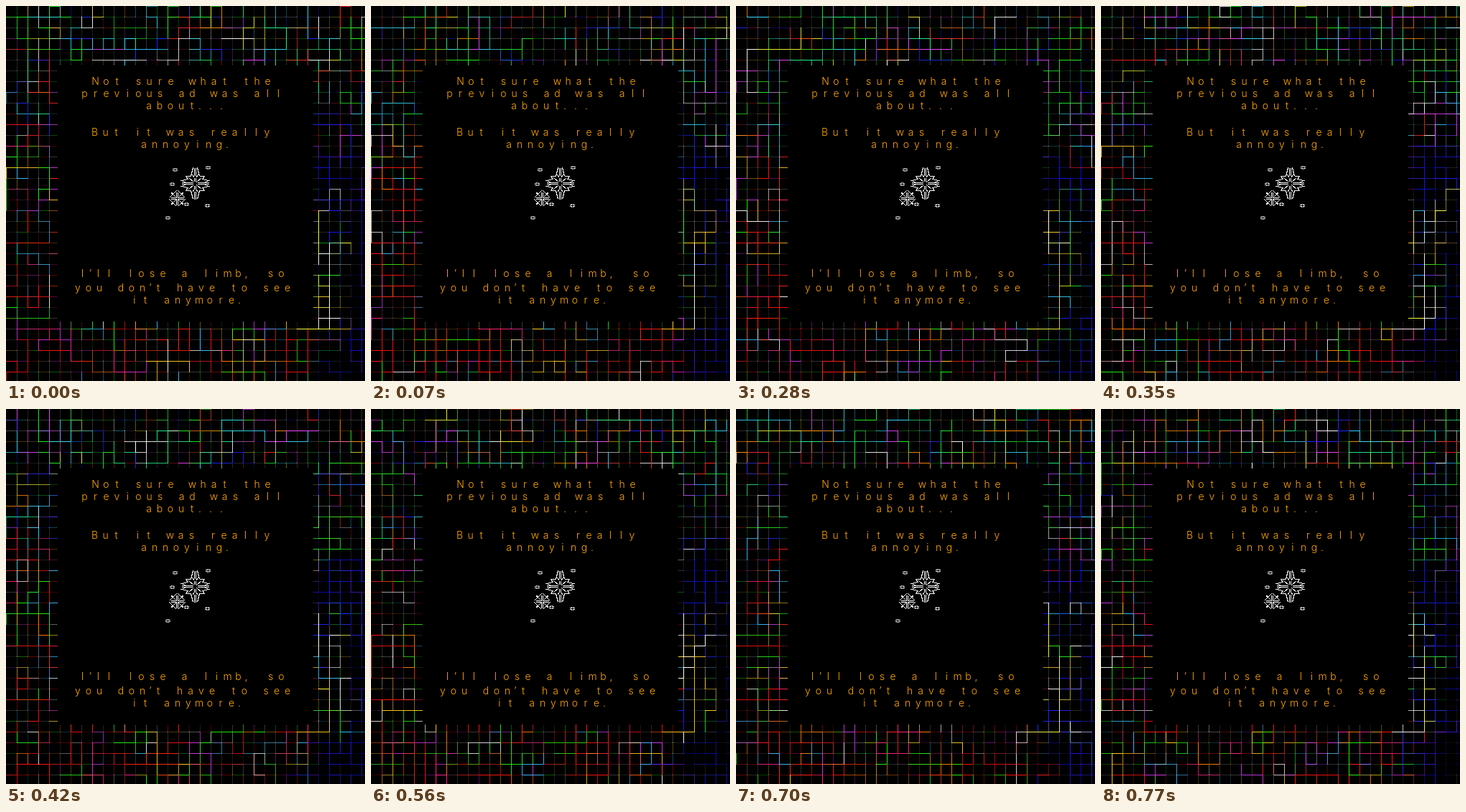
These frames come from a looping animation (500 by 523 pixels, 840 ms). An HTML page with a canvas:

```html
<!DOCTYPE html>
<html lang="en">
<head>
<meta charset="utf-8">
<title>Grid ad</title>
<style>
  html, body { margin: 0; width: 500px; height: 523px; overflow: hidden; background: #000; }
  canvas, svg { position: absolute; left: 0; top: 0; display: block; }
  text { font: 300 14px Inter, "DejaVu Sans", sans-serif; text-anchor: middle; fill: #ffa500; white-space: pre; }
  .star { fill: none; stroke: #fff; stroke-width: 1; shape-rendering: crispEdges; }
</style>
</head>
<body>
<canvas id="grid" width="500" height="523"></canvas>
<svg id="art" width="500" height="523" viewBox="0 0 500 523"></svg>
<script>
const W = 500, H = 523, CELL = 15, STEP = 70, STEPS = 12;
const PANEL = { x: 72, y: 83, w: 356, h: 357 };

// Centre of the first letter, baseline, text.
const lines = [
  [124.5, 110, "Not sure what the"],
  [109.5, 127, "previous ad was all"],
  [199, 144, "about..."],
  [123.5, 181, "But it was really"],
  [192, 198, "annoying."],
  [106.5, 378, "I’ll lose a limb, so"],
  [100, 398, "you don’t have to see"],
  [179, 415, "it anymore."]
];

// One quadrant of each star; mirrored four ways.
const shapes = {
  big: "M1-22V-11M3-22L6-10M6-10L13-10L10-6L19-4L12-1M1-8L4-12M1-8V-3M2-2L9-8M3-1H19",
  mid: "M1-11L5-7L8-8L7-5L11-1M1-9V-1H9M2-2L8-8",
  tiny: "M3.5-1H1V-2.5"
};
const stars = [
  ["big", 263.5, 247.5], ["mid", 238.5, 268.5],
  ["tiny", 235.5, 228.5], ["tiny", 281.5, 225.5], ["tiny", 231.5, 248.5],
  ["tiny", 251.5, 276.5], ["tiny", 280.5, 278.5], ["tiny", 225.5, 295.5]
];

const star = ([kind, x, y]) => {
  const quad = [[1, 1], [-1, 1], [1, -1], [-1, -1]]
    .map(([sx, sy]) => `<path d="${shapes[kind]}" transform="scale(${sx} ${sy})"/>`).join("");
  return `<g class="star" transform="translate(${x} ${y})">${quad}</g>`;
};

// Fixed pitch; marks sit at the left of their cell and the apostrophe is narrow.
function label([x, y, s]) {
  const xs = [...s].map(c => {
    const at = /[.,’]/.test(c) ? x - 4 : x;
    x += c === "’" ? 7 : CELL;
    return at;
  });
  return `<text x="${xs.join(" ")}" y="${y}">${s}</text>`;
}
document.getElementById("art").innerHTML = lines.map(label).join("") + stars.map(star).join("");

const ctx = document.getElementById("grid").getContext("2d");
const palettes = {
  mixed: ["#fff", "#3df", "#2e2", "#2e2", "#e4f", "#22f", "#ee3", "#f22", "#f80", "#2e8"],
  warm: ["#f11", "#f11", "#f21", "#f11", "#f70", "#fc2", "#2e1", "#2e1", "#eee", "#f28", "#3bf", "#c3e"],
  cool: ["#2e2", "#22f", "#e4f", "#3cf", "#2e2", "#fff", "#f22"],
  blue: ["#11f", "#11f", "#22f", "#11f", "#62e"],
  light: ["#fff", "#fff", "#ff4", "#fc2", "#2e2", "#3cf", "#22f"]
};

function random(seed) {
  let a = seed * 0x9E3779B1 | 0;
  return () => {
    a = a + 0x6D2B79F5 | 0;
    let t = Math.imul(a ^ a >>> 15, 1 | a);
    t ^= t + Math.imul(t ^ t >>> 7, 61 | t);
    return ((t ^ t >>> 14) >>> 0) / 4294967296;
  };
}

// Colour mood and strength around the frame.
function zone(x, y) {
  if (y < 84) return ["mixed", 1];
  if (x > 428) {
    if (y < 200) return ["cool", .9];
    if (y < 285) return ["blue", .7];
    if (x > 465 || y > 450) return ["blue", .5];
    return ["light", 1];
  }
  if (y < 190) return ["mixed", .85];
  return ["warm", 1];
}

const inPanel = (x, y) =>
  x > PANEL.x && x < PANEL.x + PANEL.w && y > PANEL.y && y < PANEL.y + PANEL.h;

function edge(x, y, dx, dy, color, alpha, dotted) {
  ctx.fillStyle = color;
  ctx.globalAlpha = alpha;
  const x0 = Math.min(x, x + dx * CELL), y0 = Math.min(y, y + dy * CELL);
  if (!dotted) return ctx.fillRect(x0, y0, dx ? CELL + 1 : 1, dy ? CELL + 1 : 1);
  for (let i = 0; i < CELL; i += 2) ctx.fillRect(x0 + (dx ? i : 0), y0 + (dy ? i : 0), 1, 1);
}

function run(x, y, dx, dy, n, color, alpha) {
  for (let i = 0; i < n; i++) edge(x + dx * i * CELL, y + dy * i * CELL, dx, dy, color, alpha);
}

function drawGrid(step) {
  const rnd = random(step + 11);
  const pick = list => list[Math.floor(rnd() * list.length)];
  const cell = size => CELL * Math.floor(rnd() * size / CELL + 1);

  ctx.globalAlpha = 1;
  ctx.fillStyle = "#000";
  ctx.fillRect(0, 0, W, H);

  for (let y = 0; y < H; y += CELL) for (let x = 0; x < W; x += CELL) {
    const [mood, power] = zone(x, y);
    const dim = (dx, dy) =>
      edge(x, y, dx, dy, rnd() < .3 ? "#888" : pick(palettes[mood]), (.3 + rnd() * .5) * power, true);
    if (y) dim(1, 0);
    if (x) dim(0, 1);
  }

  for (let n = 0; n < 310; n++) {
    let x, y;
    do { x = cell(W); y = cell(H); } while (inPanel(x, y));
    const color = pick(palettes[zone(x, y)[0]]), glow = .45 + rnd() * .55;
    let [dx, dy] = pick([[1, 0], [-1, 0], [0, 1], [0, -1]]);
    for (let left = 2 + Math.floor(rnd() * 5); left > 0; left--) {
      if (x + dx * CELL >= 0 && y + dy * CELL >= 0 && x + dy > 0 && y + dx > 0)
        edge(x, y, dx, dy, color, glow * zone(x, y)[1]);
      x += dx * CELL;
      y += dy * CELL;
      if (rnd() < .5) [dx, dy] = rnd() < .5 ? [dy, dx] : [-dy, -dx];
    }
  }

  // Paths that stay lit in most steps.
  run(435, 285, 0, 1, 4, pick(["#fff", "#ff4", "#2e2"]), .9);
  run(450, 345, 0, 1, 7, pick(["#fff", "#ff4", "#fc2"]), .9);
  run(405, 450, 1, 0, 3, pick(["#fff", "#ff4", "#fc2"]), .9);
  run(450, 210, 0, 1, 3, "#11f", .8);
  run(0, 330, 1, 0, 4, "#f11", .8);
  run(0, 405, 1, 0, 4, "#f11", .7);

  ctx.globalAlpha = 1;
  ctx.fillStyle = "#000";
  ctx.fillRect(PANEL.x, PANEL.y, PANEL.w, PANEL.h);
}

let shown = -1;
function frame() {
  const step = Math.floor(performance.now() / STEP) % STEPS;
  if (step !== shown) drawGrid(shown = step);
  requestAnimationFrame(frame);
}
frame();
</script>
</body>
</html>
```
